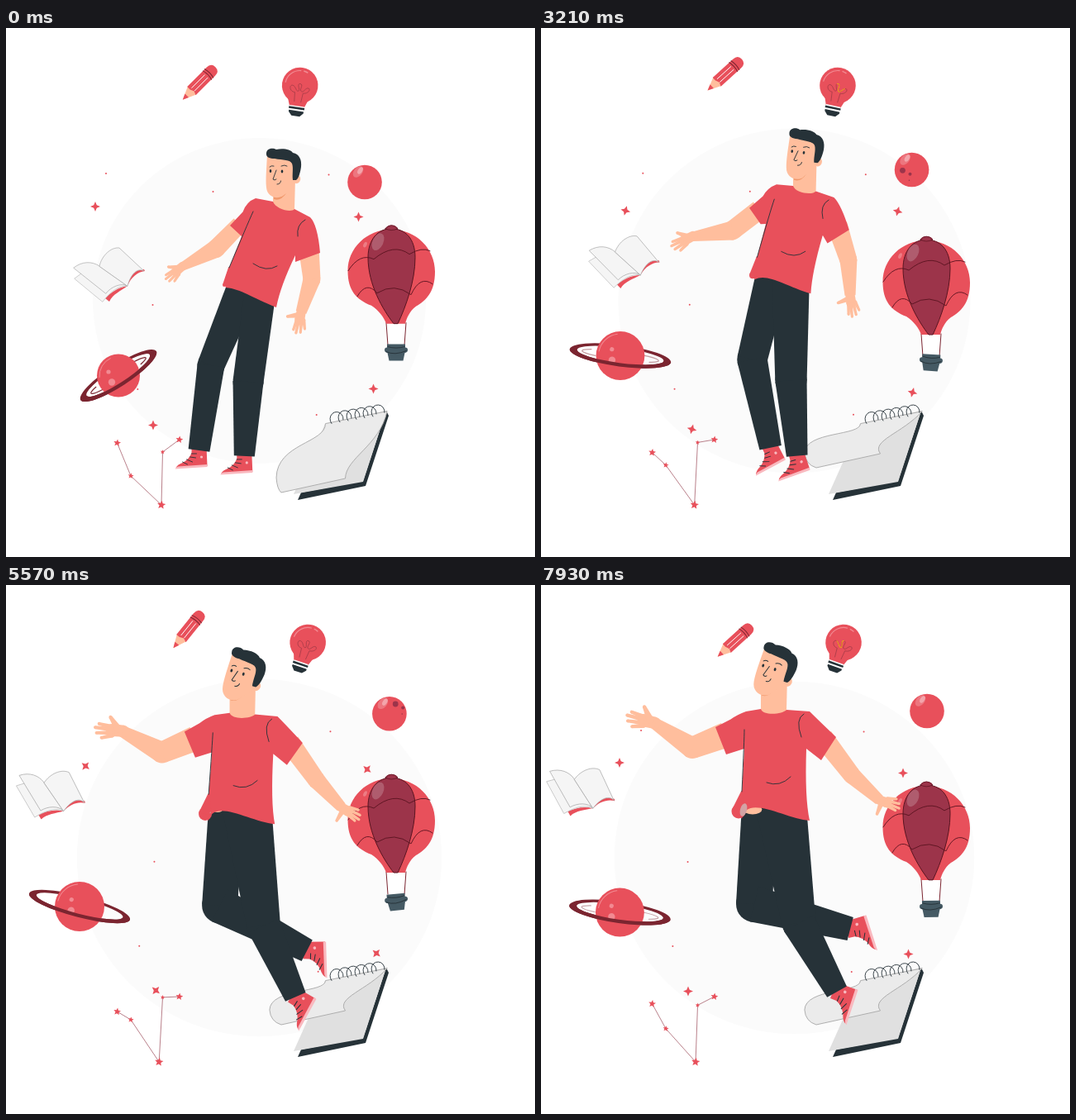
Animation of 640 by 640 pixels, one loop 8000 ms. Source, as an HTML page with a canvas:

```html
<!DOCTYPE html>
<html lang="en">
<head>
<meta charset="utf-8">
<title>Floating ideas</title>
<style>
html, body { margin: 0; width: 100%; height: 100%; overflow: hidden; background: #fff; }
canvas { display: block; width: 100vw; height: 100vh; }
</style>
</head>
<body>
<canvas id="stage"></canvas>
<script>
const canvas = document.getElementById('stage');
const ctx = canvas.getContext('2d');
const ratio = window.devicePixelRatio || 1;
canvas.width = canvas.height = 640 * ratio;

const LOOP = 8000, STEPS = 112, RAD = Math.PI / 180;
const RED = '#e8505b', INK = '#263238', SKIN = '#ffbe9d', WINE = '#7b2530',
      PLUM = '#9c344a', PINK = '#f28a92', LINE = '#5a1420', SLATE = '#455a64';

// Motion: rise lifts the man, late drives his shins and hands, drift carries the small things
let now = 0, rise = 0, late = 0, drift = 0;

const lerp = (a, b, u) => a + (b - a) * u;
const span = (from, to) => Math.min(Math.max((now - from) / (to - from), 0), 1);
const smooth = u => u * u * u * (u * (u * 6 - 15) + 10);
const sine = u => (1 - Math.cos(Math.PI * u)) / 2;
const wave = (mean, amp, period, peak) => mean + amp * Math.cos(2 * Math.PI * (now - peak) / period);
const grow = (a, b) => lerp(a, b, rise);
// Start point, end point and an optional sideways bow halfway
const move = ([x0, y0, x1, y1, bx = 0, by = 0]) => {
  const bow = 4 * rise * (1 - rise);
  return [grow(x0, x1) + bx * bow, grow(y0, y1) + by * bow];
};
const mix = (a, b, u = 0.5) => [lerp(a[0], b[0], u), lerp(a[1], b[1], u)];
const bone = ([x, y], deg, len) => [x + len * Math.cos(deg * RAD), y + len * Math.sin(deg * RAD)];

function paint(path, fill, stroke, width = 1) {
  if (fill) { ctx.fillStyle = fill; ctx.fill(path, 'evenodd'); }
  if (stroke) { ctx.strokeStyle = stroke; ctx.lineWidth = width; ctx.stroke(path); }
}
const shape = (d, fill, stroke, width) => paint(new Path2D(d), fill, stroke, width);

function oval(x, y, rx, ry, fill, deg = 0) {
  const p = new Path2D();
  p.ellipse(x, y, rx, ry, deg * RAD, 0, 7);
  paint(p, fill);
}
const disc = (x, y, r, fill) => oval(x, y, r, r, fill);

function arc(x, y, rx, ry, from, to, color, width = 1) {
  const p = new Path2D();
  p.ellipse(x, y, rx, ry, 0, from * RAD, to * RAD);
  paint(p, null, color, width);
}

function place(x, y, deg, scale, draw) {
  ctx.save();
  ctx.translate(x, y);
  ctx.rotate(deg * RAD);
  ctx.scale(scale, scale);
  draw();
  ctx.restore();
}

function star(x, y, r, points, inner, deg) {
  ctx.beginPath();
  for (let i = 0; i < points * 2; i++)
    ctx.lineTo(...bone([x, y], deg - 90 + i * 180 / points, i % 2 ? r * inner : r));
  ctx.fillStyle = RED;
  ctx.fill();
}

// Tapered chain of bones with round joints
function limb(pts, widths, fill, cap) {
  pts.forEach(([x, y], i) => {
    if ((i && i < pts.length - 1) || cap) disc(x, y, widths[i] / 2, fill);
    if (!i) return;
    const [px, py] = pts[i - 1];
    const a = Math.atan2(y - py, x - px), s = -Math.sin(a), c = Math.cos(a);
    const r = widths[i - 1] / 2, q = widths[i] / 2;
    shape(`M${[px + s * r, py + c * r]}L${[x + s * q, y + c * q]}L${[x - s * q, y - c * q]}L${[px - s * r, py - c * r]}Z`, fill);
  });
}

function backdrop() {
  const r = wave(211, 10, 13500, 6150);
  oval(306.5, 330, r, r - 4.5, '#fbfbfb');
  const sway = Math.sin(Math.PI * now / LOOP);
  for (const [x, y] of [[121, 176], [250.5, 198], [390.5, 177.5], [177.5, 335], [159.3, 437], [375.7, 468]])
    disc(x + 2.4 * sway, y - 0.3 * sway, 1, RED);

  const spin = 45 * Math.sin(Math.PI * now / 4000) ** 2;
  const bump = wave(0.5, 0.5, LOOP, 4000);
  const sparkle = (x, y, dx, dy, bx, by) =>
    star(x + dx * drift + bx * bump, y + dy * drift + by * bump, 6, 4, 0.42, spin);
  sparkle(108, 216, -13, -1, 0, 6);
  sparkle(426.5, 228.5, 11.5, -1, 0, -7);
  sparkle(444.5, 436.5, 0, 10, 5.5, 0);
  sparkle(178, 480.5, 0, 11, 5, 0);
}

function pencil() {
  const swing = wave(0, 1, LOOP, 4300);
  place(206.5 - 7.5 * swing, 80 - 7 * swing, wave(-46.5, -4.5, 4280, 1290), 1, () => {
    shape('M0,0L16,-7.2L18,0L16,7.2Z', SKIN);
    shape('M0,0L7,-3.2L7,3.2Z', RED);
    shape('M15,-7.3H48Q56,-7.3 56,0T48,7.3H15L17,2.5L15,-2.5Z', RED);
    shape('M18,-2.4H40M18,2.6H40', null, '#fff', 0.9);
    shape('M42,-7.3Q44,0 42,7.3M45,-7.3Q47,0 45,7.3', null, WINE);
  });
}

function bulb() {
  place(grow(355.7, 366), 69.5, grow(8.5, 19.6), 1, () => {
    shape('M-13,15L-9,26H9L13,15Z', RED);
    disc(0, 0, 21.8, RED);
    shape('M-9,25H9V34H-9Z', '#fff');
    shape('M-9.5,26.5H9.5V29H-9.5ZM-9,31H9V33L5,37.5H-5L-9,33Z', INK);
    arc(0, 0, 18, 18, 185, 265, PINK, 1.2);
    arc(0, 0, 18, 18, 278, 292, PINK, 1.5);
    const wire = new Path2D('M-4,20L-5,9C-12,9 -13,1 -9,1C-5,1 -4,8 -1,7C2,6 -5,-2 0,-2C5,-2 -1,6 3,7C6,8 7,1 11,2C14,4 10,9 5,9L4,20');
    paint(wire, null, '#a03a46', 0.7);
    // A spark runs along the wire now and then
    const glow = (now - 2100 + 5050) % 5050;
    if (glow < 2000) {
      ctx.setLineDash([20, 300]);
      ctx.lineDashOffset = 20 - glow * 0.0575;
      paint(wire, null, '#f0a020', 1);
      ctx.setLineDash([]);
    }
  });
}

function ball() {
  place(lerp(434, 467, drift), lerp(186.5, 152.5, drift), 0, 1, () => {
    disc(0, 0, 20.8, RED);
    ctx.save();
    ctx.beginPath();
    ctx.arc(0, 0, 20.8, 0, 7);
    ctx.clip();
    const dx = (now - 3930) * 0.0078, dy = (now - 3930) * -0.0053;
    disc(-5.5 + dx, -3 + dy, 3.4, PLUM);
    disc(3.5 + dx, 1.5 + dy, 2, PLUM);
    disc(2.5 + dx, 9 + dy, 0.8, PLUM);
    ctx.restore();
    oval(-8, -12.5, 5, 7.8, 'rgba(255,255,255,.22)', 40);
    oval(-5.5, -14, 2.6, 4.6, 'rgba(255,255,255,.35)', 32);
  });
}

function balloon() {
  const dy = wave(3.5, 14.5, LOOP, 2250);
  ctx.save();
  ctx.translate(0, dy);
  shape('M460,356L462,384H482L484,356Z', '#fff');
  shape('M460,356L462,383M484,356L482,383', null, WINE);
  oval(466.5, 242.5, 7.5, 4.6, PLUM);
  shape('M466,243C497,243 519,267 519,294C519,319 508,329 496,336C488,342 485,350 483,357H460C457,349 451,341 442,335C424,328 413.5,317 413.5,293C413.5,266 436,243 466,243Z', RED);
  shape('M466,242C483,242 495,254 495,277C495,305 484,336 474,357H469C456,340 438,310 438,277C438,255 450,242 466,242Z', PLUM, LINE);
  shape('M459,242Q466,234 474,242Q466,246 459,242Z', PLUM, LINE, 0.7);
  shape('M414,293Q428,271 445,279Q469,259 488,273Q503,264 513,269M425,324Q436,305 449,320Q470,307 490,322Q501,298 516,309', null, LINE, 0.9);
  oval(450, 258, 6.5, 11, 'rgba(255,255,255,.2)', 25);
  oval(434.5, 261.5, 2, 3.5, 'rgba(255,255,255,.25)', 25);
  place(472, 388 - dy * 0.08, wave(0, 6, LOOP, 2000), 1, () => {
    shape('M-11,-6H11V2L8.5,14H-8.5L-11,2Z', SLATE);
    limb([[-11, 1], [-5, 4], [5, 4], [11, 1]], [6, 5, 5, 6], SLATE, true);
    shape('M-10,-3Q0,0 10,-3M-12,3Q-2,8 12,2', null, INK, 0.9);
  });
  ctx.restore();
}

function book() {
  place(grow(147, 63), grow(312, 270), grow(0, 22), 1, () => {
    shape('M0,0C-12,2 -20,8 -27,15L-22,19C-18,10 -8,6 0,0C4,-10 12,-17 21,-18L20,-20C8,-20 2,-11 0,0Z', RED);
    shape('M-64,-9L-52,-18L0,0C-13,0 -22,9 -30,19Z', '#f5f5f5', '#bbb', 0.7);
    shape('M-65,-22C-55,-30 -43,-30 -34,-24L0,0C-8,-4 -20,1 -26,9Z', '#f5f5f5', '#aaa', 0.7);
    shape('M-34,-24C-31,-37 -20,-47 -10,-46L20,-18C10,-23 3,-11 0,0Z', '#f5f5f5', '#aaa', 0.7);
  });
}

function planet() {
  // Glides in, settles and starts back
  const swing = Math.abs(Math.sin(Math.PI / 2 * (5600 - now) / 5600));
  const far = swing ** 4;
  const x = 89 + 47 * far, y = 389 + 31.5 * swing ** 3;
  const r = 30 - 4 * far, a = 63 - 8.5 * far, tilt = 14.5 - 47.5 * far;
  const ring = new Path2D();
  ring.ellipse(0, 0, a, 13, 0, 0, 7);
  ring.closePath();
  ring.ellipse(0, -0.5, a - 9, 9.2, 0, 0, 7);
  place(x, y, tilt, 1, () => {
    paint(ring, WINE);
    ctx.globalAlpha = Math.min(1, far * 3);
    arc(0, 0, a - 15, 5, -55, 40, WINE, 1.2);
    arc(0, 0, a - 15, 5, 130, 220, WINE, 1.2);
  });
  disc(x, y, r, RED);
  place(x, y, 20 * (1 - far), 1, () => {
    disc(-12, -4.5, 2.6, PINK);
    disc(-8, 8, 4.2, PINK);
    arc(0, 0, r - 3, r - 3, 175, 245, PINK);
  });
  place(x, y, tilt, 1, () => {
    ctx.beginPath();
    ctx.rect(-80, 0, 160, 40);
    ctx.clip();
    paint(ring, WINE);
  });
}

function constellation() {
  const c = wave(0.5, 0.5, 10000, 4800);
  const p = [[134.5, 502 + 15 * c], [151, 542 - 17 * c], [188 - 3 * c, 577], [189.5, 513 - 15 * c], [209.7, 498]];
  shape('M' + p.join('L'), null, '#a8606c', 0.8);
  [4.6, 3.6, 5.4, 2.8, 4.6].forEach((r, i) => star(...p[i], r, 5, 0.45, 8));
}

function notepad() {
  const y = lerp(562, 532, sine(span(0, 3150)));
  const h = y - 479, lift = 562 - y, left = 327 - lift * 0.27;
  shape('M460,463L463,469L435,554L353,571L357,562L432,548Z', INK);
  shape('M386,479L460,463L432,549L348,564Z', '#e0e0e0');
  shape(`M386.5,479C386.5,${479 + h * 0.28} ${left + 1},${y - 18 - h * 0.5} ${left},${y - 18}
    Q${left + 1},${y - 4} 333,${y}L410.5,${y - 17}
    C${411 - lift * 0.4},${y - 17 - h * 0.3} ${452 - lift * 0.5},${464 + h * 0.5} 461,464Z`, '#ebebeb', '#a8a8a8', 0.9);
  for (let i = 0; i < 6; i++)
    arc(400 + i * 10, 473 - i * 1.7, 8, 8.5, 140, 365, INK, 0.9);
}

const body = {
  neckL: [323, 210, 266, 150], neckR: [349, 219, 297, 151],
  shoulderL: [302, 206, 248, 153], shoulderR: [368, 229, 325, 153],
  pitL: [284, 255, 246, 198], pitR: [350, 275, 321, 198],
  sideL: [270, 290, 243, 250], sideR: [332, 312, 319, 258],
  hipL: [262, 308, 235, 265],
  hemL: [266, 314, 243, 283], hemM: [285, 316, 248, 252], hemR: [327, 338, 325, 285],
  cuffL: [271, 239, 211, 172], innerL: [285, 252, 224, 205],
  cuffR: [380, 272, 357, 184], innerR: [350, 283, 339, 212],
  elbowL: [254, 267, 183, 197], elbowR: [370, 304, 376, 230],
  topL: [288, 312, 264, 268], topR: [308, 316, 289.5, 262],
  kneeL: [248, 408, 258, 386, 5, 0], kneeR: [293, 428, 312, 409, 4, 5],
  eyes: [327, 173, 276, 99.5], crease: [362, 232, 318, 156],
  seam: [299, 222, 246, 175], belly: [299, 285, 273, 239]
};

function hand([x, y], deg, scale, thumb) {
  place(x, y, deg, scale, () => {
    limb([[-2, 0], [11, 0]], [13, 14], SKIN, true);
    for (const [tx, ty] of [[26, 6], [30, 1.5], [28, -4.5], [22, -9.5]])
      limb([[10, ty * 0.6], [tx, ty]], [5, 3.6], SKIN, true);
    limb([[4, 2], bone([0, 0], thumb, 20)], [8, 4], SKIN, true);
  });
}

function shoe([x, y], deg) {
  place(x, y, deg, grow(1, 1.14), () => {
    shape('M-9,-4H9L10,19L-28,21Q-26,17 -20,15Q-12,11 -9,3Z', RED);
    shape('M10,17L10,20L-29,22.5Q-28,20 -25,19.5Z', '#f9b9bf');
    shape('M-9,4L-3,4M-11,8L-4,9M-15,11L-8,14M-20,14L-14,17', null, INK, 0.9);
    disc(3, 8, 1.6, '#f9b9bf');
  });
}

function head([x, y]) {
  place(x, y, grow(0, 16), grow(1, 1.08), () => {
    oval(25, 10, 4.2, 5.2, SKIN, 15);
    shape('M-11,-20C-12,0 -13,10 -12,20C-11,31 0,35 8,30L24,13V-15Z', SKIN);
    shape('M-12,-20C-13,-27 -5,-29 0,-26C8,-28 18,-26 20,-22C28,-21 31,-13 30,-5C29,2 27,9 24,11H20C19,4 21,-4 19,-9C17,-14 8,-13 -2,-15C-8,-15 -12,-17 -12,-20Z', INK);
    oval(-7, 0, 1.3, 1.9, INK);
    oval(7, 0.5, 1.3, 1.9, INK);
    shape('M-8,-5Q-6,-7 -3,-6M6,-6Q10,-8 13,-6M0,-1L-4,10Q-2,12 0,10M1,16Q5,16 5.5,12', null, INK, 0.9);
  });
}

function man() {
  const p = {};
  for (const name in body) p[name] = move(body[name]);
  const turn = (a, b) => lerp(a, b, late);
  const ankleL = bone(p.kneeL, turn(98, 14.5), grow(104, 120));
  const ankleR = bone(p.kneeR, turn(93, 61), grow(90, 95));
  const wristL = bone(p.elbowL, grow(152, 213), grow(47, 56));
  const wristR = bone(p.elbowR, grow(108, 42), grow(42, 45));

  shoe(ankleL, turn(0, -104));
  limb([p.topL, p.kneeL, ankleL], [grow(40, 42), grow(33, 44), grow(26, 29)], INK);
  shoe(ankleR, turn(0, -68));
  limb([p.topR, p.kneeR, ankleR], [grow(38, 62), grow(37, 41), grow(25, 27)], INK);
  const bare = 6 * smooth(span(4500, 6500));
  oval(256, 271.5, bare * 1.9, bare, SKIN);

  limb([mix(mix(p.cuffL, p.innerL), p.shoulderL, 0.2), p.elbowL, wristL], [grow(20, 31), grow(22, 26), grow(10, 14)], SKIN);
  hand(wristL, turn(140, 193), grow(0.8, 1.1), grow(40, 47));
  limb([mix(mix(p.cuffR, p.innerR), p.shoulderR, 0.3), p.elbowR, wristR], [25, 21, 13], SKIN);
  hand(wristR, turn(101, 20), 0.86, turn(62, 80));

  const [rx, ry] = p.hemR, [sx, sy] = p.shoulderL, [tx, ty] = p.shoulderR;
  shape(`M${p.neckL}L${p.shoulderL}Q${sx - 11},${sy + 4} ${mix(p.shoulderL, p.cuffL)}L${p.cuffL}L${p.innerL}L${p.pitL}
    L${p.sideL}Q${p.hipL} ${p.hemL}C${p.hemM} ${rx - 30},${ry - grow(12, 2)} ${p.hemR}
    Q${p.sideR} ${p.pitR}L${p.innerR}L${p.cuffR}Q${tx + 9},${ty + 9} ${p.shoulderR}L${p.neckR}Z`, RED);
  // Rounded lower corner of the shirt and its turned-up lining
  limb([p.sideL, mix(p.hipL, p.hemL)], [2, grow(4, 17)], RED, true);
  const fold = 8 * smooth(span(5000, 7200));
  oval(p.hipL[0] + 10, p.hipL[1] + 7, fold / 2, fold, '#d3a3a4', 15);

  const [nx, ny] = p.neckR, [mx, my] = p.neckL, ey = p.eyes[1];
  shape(`M${mx},${ey + 22}L${nx + 1},${ey + 8}L${p.neckR}C${nx - 4},${ny + 5} ${mx + 3},${my + 9} ${p.neckL}Z`, SKIN);
  shape(`M${mx + 1},${ey + 31}Q${mx + 9},${ey + 33} ${mx + 16},${ey + 27}Q${mx + 9},${ey + 37} ${mx + 1},${ey + 34}Z`, '#f0986c');
  head(p.eyes);

  shape(`M${p.seam}Q${mix(p.pitL, p.seam)} ${p.sideL}
    M${p.crease}q-11,6 ${grow(-9, -3)},${grow(20, 28)}
    M${p.belly}q16,${grow(11, 6)} 29,${grow(3, -7)}`, null, INK, 0.9);
}

function frame() {
  const step = LOOP / STEPS;
  now = Math.floor((performance.now() % LOOP) / step + 0.1) % STEPS * step;
  rise = smooth(span(700, 7000));
  late = smooth(span(900, 7500));
  drift = sine(span(0, 6950));
  ctx.setTransform(ratio, 0, 0, ratio, 0, 0);
  ctx.fillStyle = '#fff';
  ctx.fillRect(0, 0, 640, 640);
  ctx.lineCap = ctx.lineJoin = 'round';
  for (const draw of [backdrop, pencil, bulb, ball, balloon, book, planet, constellation, notepad, man]) draw();
  requestAnimationFrame(frame);
}
frame();
</script>
</body>
</html>
```
